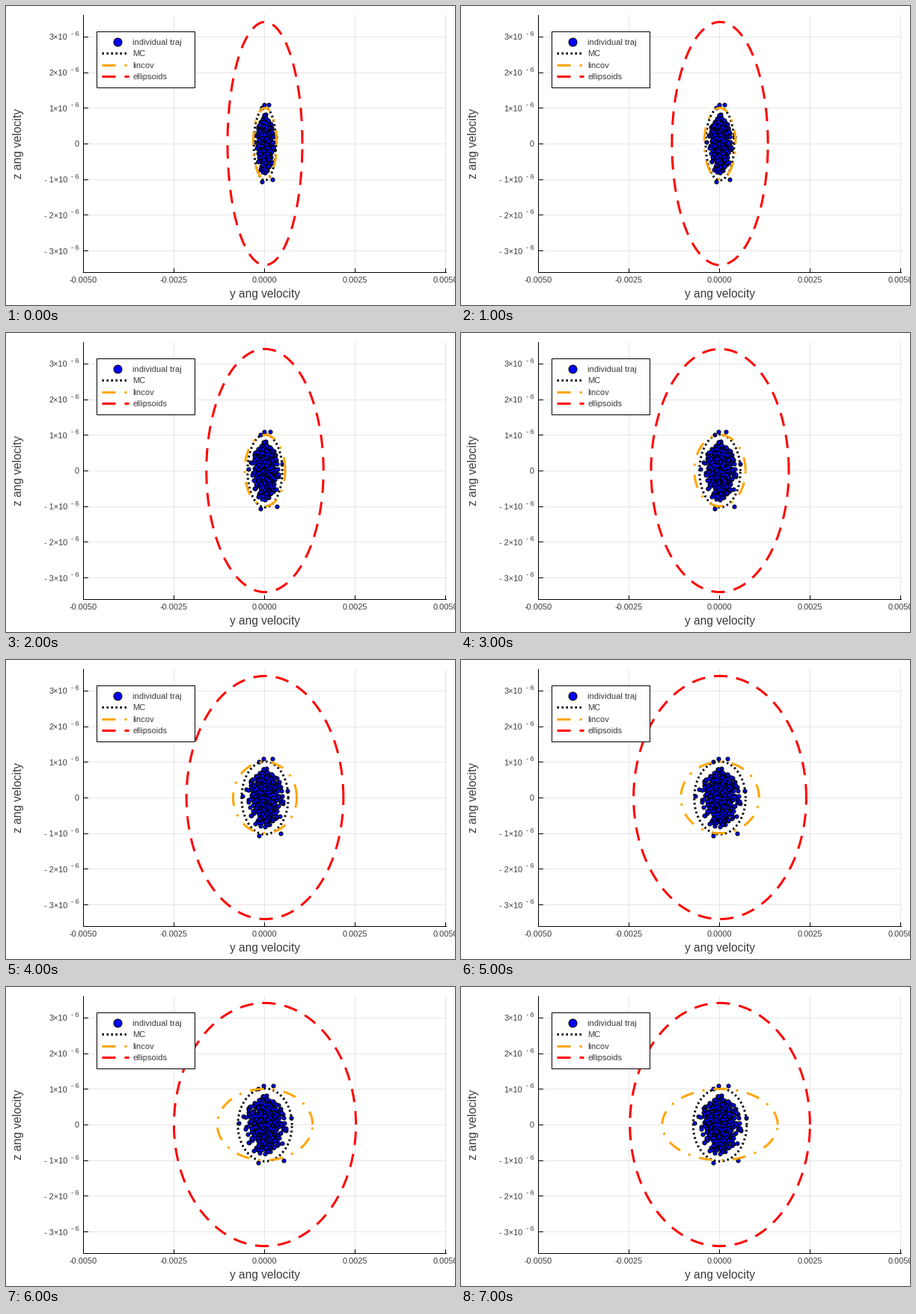
These frames come from a looping animation (600 px wide and 400 px high, 8 s). A matplotlib script:

```python
import numpy as np
import matplotlib.pyplot as plt
from matplotlib.animation import FuncAnimation
from matplotlib.patches import Rectangle

W, H, DPI = 600, 400, 100
PT = 72 / DPI  # points per pixel
CX, CY, UNIT = 346, 184, 47.67
INK = "#3c3c3c"

# dash patterns in multiples of the line width
DASH = (0, (6, 4))
DASHDOT = (0, (6, 4, 1, 4))
DOT = (0, (0.8, 1.2))

plt.rcParams["font.family"] = "Liberation Sans"
fig = plt.figure(figsize=(W / DPI, H / DPI), dpi=DPI, facecolor="white")
ax = fig.add_axes([0, 0, 1, 1])
ax.set_xlim(0, W)
ax.set_ylim(H, 0)
ax.axis("off")


def line(xs, ys, color="black", width=1, **kw):
    return ax.plot(xs, ys, color=color, lw=width * PT, **kw)[0]


def dashed(xs, ys, color, style, z):
    return line(xs, ys, color, 3, ls=style, dash_capstyle="butt", zorder=z)


def text(x, y, s, size, ha="left", **kw):
    va = kw.pop("va", "baseline")
    ax.text(x, y, s, fontsize=size * PT, color=INK, ha=ha, va=va, zorder=9, **kw)


def dots(xs, ys, diameter, z):
    return ax.plot(xs, ys, "o", ms=diameter * PT, mfc="blue", mec="black",
                   mew=PT, zorder=z)[0]


def draw_axes():
    left, right, top, bottom = 103, 588, 12, 356
    for i in range(5):
        x = left + 121 * i
        line([x, x], [top, bottom], "#e6e6e6", zorder=0)
        line([x, x], [bottom - 5, bottom], zorder=1)
        text(x + 0.5, 370, f"{-0.005 + 0.0025 * i:.4f}", 11, "center")
    for k in range(-3, 4):
        y = CY - UNIT * k
        line([left, right], [y, y], "#e6e6e6", zorder=0)
        line([left, left + 6], [y, y], zorder=1)
        if k == 0:
            text(98, y + 4, "0", 10.9, "right")
            continue
        sign = "- " if k < 0 else ""
        text(82, y + 4.5, f"{sign}{abs(k)}×10", 10.9, "right")
        text(97.5, y - 1, "- 6", 9, "right")
    line([left, left], [top, bottom], zorder=1)
    line([left, right], [bottom, bottom], zorder=1)
    text(CX, 390, "y ang velocity", 15.5, "center")
    text(17, CY, "z ang velocity", 15.5, "center", va="center", rotation=90)


def draw_legend():
    ax.add_patch(Rectangle((121, 33.5), 131, 75, fc="white", ec="black",
                           lw=PT, zorder=7))
    dots([149], [48], 11, 8)
    rows = [("MC", "black", DOT), ("lincov", "orange", DASHDOT),
            ("ellipsoids", "red", DASH)]
    text(169, 52, "individual traj", 11.1)
    for i, (name, color, style) in enumerate(rows, 1):
        y = 48 + 15.3 * i
        dashed([128, 164], [y, y], color, style, 8)
        text(169, y + 4, name, 11.1)


def make_cloud():
    """Offsets from the centre at full width: a clipped normal cloud plus strays."""
    rng = np.random.default_rng(12)
    pts = rng.normal(size=(620, 2))
    pts = pts[np.hypot(*pts.T) < 2.3][:500] * (13.2, 17.5)
    strays = [(-9, -48.5), (-2, -52), (11, -52), (-34.5, -2), (35, -9),
              (24.5, 47.5), (-9, 50.5)]
    return np.vstack([pts, strays])


draw_axes()
draw_legend()
cloud = make_cloud()
theta = np.linspace(0, 2 * np.pi, 400)

points = dots([], [], 5.1, 3)
mc = dashed([], [], "black", DOT, 4)
lincov = dashed([], [], "orange", DASHDOT, 5)
bound = dashed([], [], "red", DASH, 6)


def bound_width(t):
    """Grows steadily, then levels off and turns back."""
    return 50 + 14.15 * t - 0.00171 * t**5


def lincov_width(t):
    return 30.7 * 1.17**t - 15


def set_ellipse(artist, rx, ry, cy=CY):
    artist.set_data(CX + rx * np.cos(theta), cy - ry * np.sin(theta))


def update(t):
    spread = bound_width(t) / 121
    points.set_data(CX + spread * cloud[:, 0], CY + cloud[:, 1])
    set_ellipse(mc, 36 * spread, 48.7, CY + 0.5)
    set_ellipse(lincov, lincov_width(t), UNIT)
    set_ellipse(bound, bound_width(t), 162.6)
    return points, mc, lincov, bound


anim = FuncAnimation(fig, update, frames=8, interval=1000, repeat=True,
                     repeat_delay=0)
plt.show()
```
